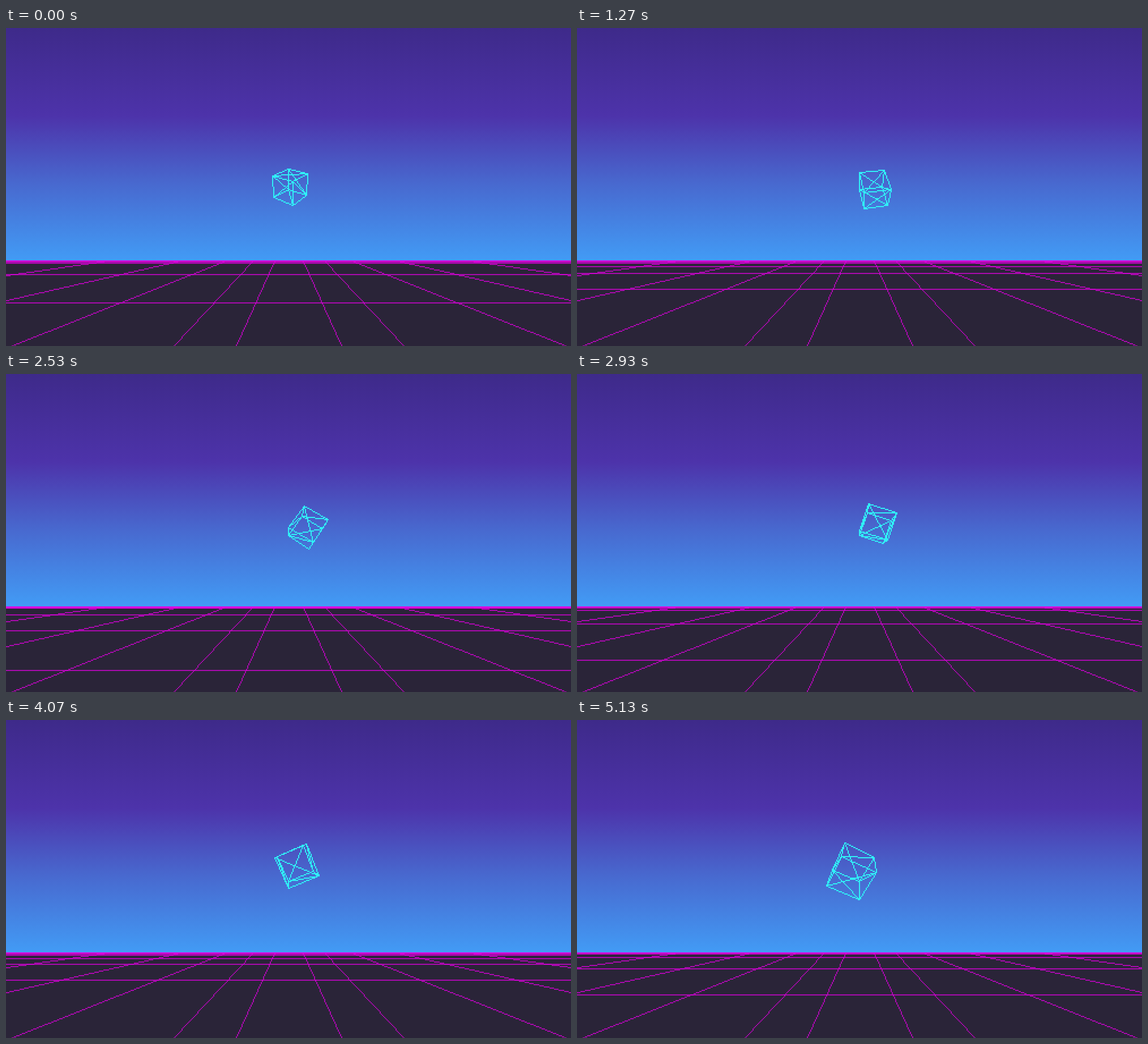
Write an HTML page with a canvas that moves like this. It is 998 by 561 pixels and loops after 5190 ms.

```html
<!DOCTYPE html>
<html lang="en">
<head>
<meta charset="utf-8">
<title>Neon cube</title>
<style>
  html, body { margin: 0; width: 100%; height: 100%; overflow: hidden; }
  body {
    background: linear-gradient(#3e2a8a 0, #4d33aa 155px, #4869cf 275px, #429bf5 410px, #2a2438 410px);
  }
  canvas {
    display: block;
    width: 998px;
    height: 562px;
    image-rendering: pixelated;
  }
</style>
</head>
<body>
<canvas id="view" width="499" height="281"></canvas>
<script>
const ctx = document.getElementById('view').getContext('2d');
const W = 499, H = 281, PX = 2;
const LOOP = 5190, STEPS = 78;
const HORIZON = 411, DEPTH = 150;
const CYAN = '#30f0f6', MAGENTA = 'rgba(225,0,225,.7)';

// Floor rails on the left half: top x, then the near end x, y.
const rails = [[475, 407, 561], [437, 297, 561], [388, 11, 561], [308, 0, 480], [181, 0, 436]];

// Times at which the cross lines leave the bottom edge; the group repeats.
const exits = [1.83, 2.255, 2.68, 3.177, 3.755];
const GROUP = 2.82, GROWTH = 1.96;

// Cube corners are numbered by bits x = 1, y = 2, z = 4.
const edges = [];
for (let a = 0; a < 8; a++)
  for (const bit of [1, 2, 4])
    if (!(a & bit)) edges.push([a, a | bit]);
edges.push([0, 3], [1, 7], [5, 6], [4, 2], [2, 7], [5, 0]);

function line(x0, y0, x1, y1) {
  const dx = Math.abs(x1 - x0), dy = -Math.abs(y1 - y0);
  const sx = Math.sign(x1 - x0), sy = Math.sign(y1 - y0);
  let err = dx + dy;
  for (;;) {
    ctx.fillRect(x0, y0, 1, 1);
    if (x0 === x1 && y0 === y1) return;
    const e = 2 * err;
    if (e >= dy) { err += dy; x0 += sx; }
    if (e <= dx) { err += dx; y0 += sy; }
  }
}

const cell = v => Math.floor(v / PX);

function drawFloor(t) {
  ctx.fillStyle = MAGENTA;
  ctx.fillRect(0, cell(HORIZON), W, 1);
  for (let g = -1; g < 3; g++)
    for (const exit of exits) {
      const h = DEPTH * Math.exp(GROWTH * (t - exit - g * GROUP));
      if (h < DEPTH) ctx.fillRect(0, cell(HORIZON + h), W, 1);
    }
  for (const [top, x, y] of rails) {
    line(cell(top), cell(HORIZON), cell(x), cell(y));
    line(cell(999 - top), cell(HORIZON), cell(999 - x), cell(y));
  }
}

// Spins about one corner, which stays fixed on screen while it approaches.
function drawCube(t) {
  const spin = (-128 + 37.2 * t) * Math.PI / 180, tilt = spin / 2;
  const c = Math.cos(spin), s = Math.sin(spin);
  const ct = Math.cos(tilt), st = Math.sin(tilt);
  const dist = 7.45 - 0.39 * t;
  const points = [];
  for (let n = 0; n < 8; n++) {
    const x = n & 1, y = n >> 1 & 1, z = n >> 2;
    const u = x * c - y * s, v = x * s + y * c;
    const scale = 140 / (dist - (v * st + z * ct));
    points.push([Math.round(249 + u * scale), Math.round(142 - (v * ct - z * st) * scale)]);
  }
  ctx.fillStyle = CYAN;
  for (const [a, b] of edges) line(...points[a], ...points[b]);
}

// Fifteen pictures a second, each start rounded to 10 ms.
function stepAt(ms) {
  let i = Math.round(ms * 3 / 200);
  if (Math.round(i * 20 / 3) * 10 > ms) i--;
  return Math.min(i, STEPS - 1);
}

function draw() {
  const t = stepAt(performance.now() % LOOP) / 15;
  ctx.clearRect(0, 0, W, H);
  drawFloor(t);
  drawCube(t);
  requestAnimationFrame(draw);
}
draw();
</script>
</body>
</html>
```
